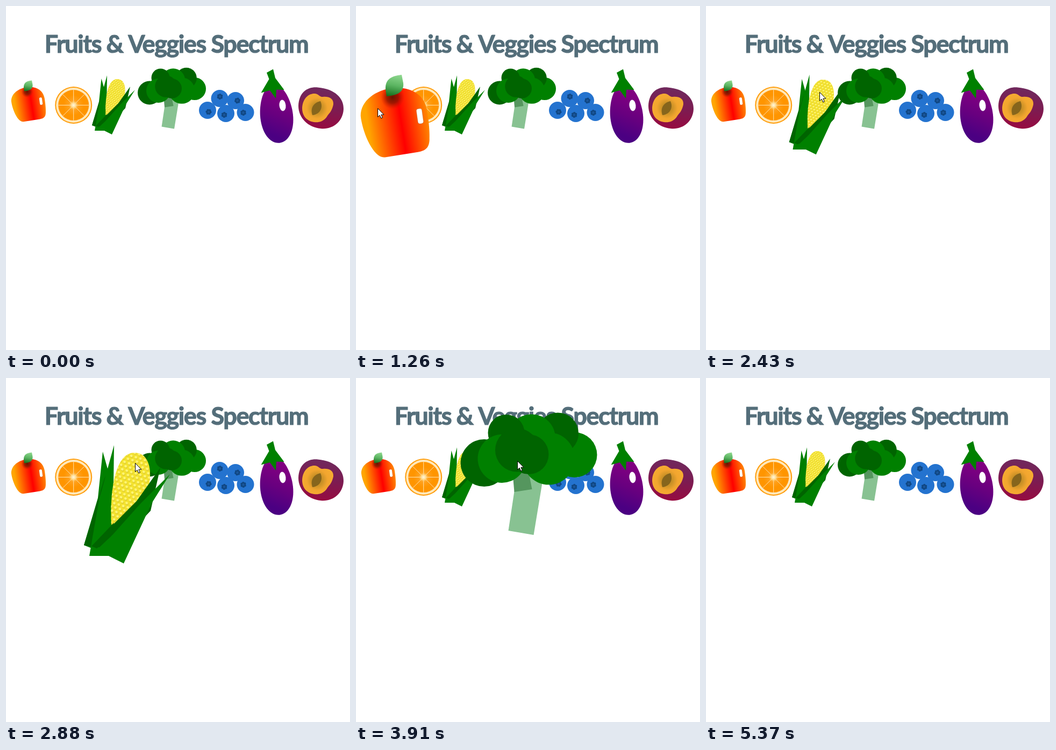
Animation, 640 px wide and 640 px high, one loop 6.11 s. Source, as an HTML page with a canvas:

```html
<!DOCTYPE html>
<html lang="en">
<head>
<meta charset="utf-8">
<title>Fruits &amp; Veggies Spectrum</title>
<style>
  html, body { margin: 0; width: 100%; height: 100%; overflow: hidden; background: #fff; }
  canvas { display: block; width: 640px; height: 640px; }
</style>
</head>
<body>
<canvas id="stage" width="640" height="640"></canvas>
<script>
const ctx = document.getElementById('stage').getContext('2d');
const LOOP = 6110, GROW = 400;
const GREEN = '#008000', DARK_GREEN = '#006400';

function fillPath(d, color) {
  ctx.fillStyle = color;
  ctx.fill(new Path2D(d));
}

function disc(x, y, r, color) {
  ellipse(x, y, r, r, 0, color);
}

function ellipse(x, y, rx, ry, angle, color) {
  ctx.beginPath();
  ctx.ellipse(x, y, rx, ry, angle, 0, Math.PI * 2);
  ctx.fillStyle = color;
  ctx.fill();
}

function withStops(gradient, colors) {
  colors.forEach((c, i) => gradient.addColorStop(i / (colors.length - 1), c));
  return gradient;
}
const linear = (x0, y0, x1, y1, ...colors) =>
  withStops(ctx.createLinearGradient(x0, y0, x1, y1), colors);
const radial = (x, y, r, ...colors) =>
  withStops(ctx.createRadialGradient(x, y, 0, x, y, r), colors);

function drawPepper() {
  ctx.save();
  ctx.translate(42.5, 182.3);
  ctx.rotate(-0.157);
  fillPath('M-31.5-8C-31.5-22-17-31.5 0-31.5C17-31.5 30.5-22 30.5-6' +
    'C30.5 8 29.5 16 28.5 21C27 29 23 31 16 31H-15C-25 31-31.5 8-31.5-8Z',
    linear(-26, 0, 36, 0, '#ffa500', '#ff0000', '#ffa500'));
  ctx.restore();

  disc(39.5, 159.5, 11, radial(39.5, 159.5, 11,
    'rgba(95,20,0,.95)', 'rgba(130,22,0,.75)', 'rgba(190,30,0,0)'));
  fillPath('M34 158.5L33 152C32.5 143 38 139.5 48 138.5L49.5 146C50.5 154 45 157.5 34 158.5Z',
    linear(44, 138, 40, 159, '#90d890', '#5cb562', '#146e1c'));

  ctx.save();
  ctx.translate(65, 177);
  ctx.rotate(-0.14);
  ctx.beginPath();
  ctx.roundRect(-2.6, -7, 5.2, 14, 2);
  ctx.fillStyle = '#fff';
  ctx.fill();
  ctx.strokeStyle = 'rgba(120,90,60,.35)';
  ctx.lineWidth = 0.4;
  ctx.stroke();
  ctx.restore();
}

function drawOrange() {
  const x = 125.7, y = 184.5;
  disc(x, y, 34.5, '#ff9d0a');
  disc(x, y, 32.5, '#ffe9bd');
  disc(x, y, 28.5, radial(x, y, 28.5, '#ffb83c', '#ffa01c', '#ff9500', '#ff9500'));
  ctx.strokeStyle = '#ffe2b0';
  ctx.lineWidth = 1;
  ctx.beginPath();
  for (let i = 0; i < 8; i++) {
    const a = i * Math.PI / 4;
    ctx.moveTo(x, y);
    ctx.lineTo(x + 28.5 * Math.cos(a), y + 28.5 * Math.sin(a));
  }
  ctx.stroke();
  disc(x, y, 9, radial(x, y, 9, '#fff6df', 'rgba(255,226,160,.8)', 'rgba(255,190,80,0)'));
}

function drawCorn() {
  fillPath('M177.5 135L186 165L184 202L170 226L160 222L173 178Z', GREEN);
  fillPath('M179 160L183 152L177 188L168 224L160 222Z', DARK_GREEN);
  fillPath('M188 129L187 202L183 232H165L174 180Z', GREEN);

  const cob = 'M185.5 203C184 175 188 136 207 136C225 136 225 165 214 182C206 194 194 200 185.5 203Z';
  fillPath(cob, '#f4e32e');
  ctx.save();
  ctx.clip(new Path2D(cob));
  ctx.translate(204, 169);
  ctx.rotate(0.3);
  for (let row = -10; row <= 10; row++) {
    for (let col = -6; col <= 6; col++) {
      const x = col * 4.4 + (row & 1) * 2.2, y = row * 3.6;
      ellipse(x + 0.6, y + 0.8, 1.4, 1.2, 0, '#e3d033');
      ellipse(x, y, 1.2, 1.1, 0, '#fff574');
    }
  }
  ctx.restore();

  fillPath('M231 150L222 190L190 224L170 224L187 203L209 181Z', DARK_GREEN);
  fillPath('M240 156L223 183L197 239L183 232H166L187 212L212 184Z', GREEN);
  fillPath('M167 223L188 201L185 214L172 225Z', DARK_GREEN);
}

function drawBroccoli() {
  fillPath('M298 168L322 174L313 228.5L289.5 224.5Z', '#88c292');
  fillPath('M293.5 171L308 168L311.5 186L295 188.5Z', '#55965e');
  const florets = [
    [351, 154, 21, 0], [335.5, 134, 19.3, 1], [311, 138.5, 22.3, 0],
    [287.5, 133.5, 17, 1], [267, 161.5, 22, 1], [283.5, 157.5, 22.5, 0],
    [327, 157.5, 24.3, 0], [297.5, 149.5, 20.3, 1], [308.5, 153.5, 18.5, 1]
  ];
  for (const [x, y, r, dark] of florets) disc(x, y, r, dark ? DARK_GREEN : GREEN);
}

function drawBerries() {
  const berries = [
    [375, 194, 2, 3], [397.5, 172, 0.5, -3.5], [427, 176, 3.5, 0],
    [409, 200, -3, 2.5], [445.5, 198, -4, 0.5]
  ];
  for (const [x, y, dx, dy] of berries) {
    disc(x, y, 16, '#2473cf');
    const cx = x + dx, cy = y + dy;
    for (let i = 0; i < 6; i++) {
      const a = i * Math.PI / 3 + x;
      disc(cx + 3.4 * Math.cos(a), cy + 3.4 * Math.sin(a), 2.2, '#104783');
    }
    disc(cx, cy, 3.8, '#104783');
    disc(cx, cy, 2.2, '#1b579b');
  }
}

function drawEggplant() {
  ctx.save();
  ctx.translate(503, 200);
  ctx.rotate(-0.11);
  fillPath('M0-54C19-54 30.5-21 30.5 5C30.5 35 17 55 0 55C-17 55-30.5 35-30.5 5C-30.5-21-19-54 0-54Z',
    linear(18, -30, -18, 35, '#800080', '#68007f', '#4b0082'));
  ctx.restore();
  ellipse(514.5, 185, 6, 10.5, -0.1, '#fff');
  fillPath('M497 117.5L485 124L489.5 136L474.5 161.5L491 157L502 172L503 155.5L517.5 156L501 134Z', GREEN);
}

function drawPlum() {
  fillPath('M544 186C545 160 561 150 580 151.5C612 154 629 172 628 192C627 215 608 230 586 228C562 226 544 208 544 186Z',
    linear(592, 152, 582, 228, '#6f295d', '#7d1b51', '#980a40'));
  fillPath('M551 190C552 170 565 162 575 163C582 164 584 170 590 169C600 168 610 172 609 183' +
    'C606 198 600 200 597 206C590 216 580 217 573 216C560 214 551 205 551 190Z',
    radial(579, 190, 29, '#b88321', '#c99126', '#f2a52f', '#f6ab31'));
  fillPath('M585 177C591 190 583 202 570 203C566 191 571 180 585 177Z', '#86651c');
}

// Hover origin is the fixed point of the enlargement.
const items = [
  { draw: drawPepper, ox: 11, oy: 149, from: 880, to: 1760 },
  { draw: drawOrange, ox: 91, oy: 150, from: 1760, to: 2332 },
  { draw: drawCorn, ox: 175, oy: 133, from: 2332, to: 3240 },
  { draw: drawBroccoli, ox: 295.5, oy: 165, from: 3310, to: 4140 },
  { draw: drawBerries, ox: 359, oy: 178, from: 4140, to: 5020 },
  { draw: drawEggplant, ox: 0, oy: 0 },
  { draw: drawPlum, ox: 0, oy: 0 }
];

// Pointer stops: time, x, y.
const pointerPath = [
  [430, 90, 609], [860, 46, 225], [1070, 40, 200], [1256, 40, 190],
  [1628, 105, 185], [1782, 140, 180], [2332, 196, 162], [2422, 211, 160],
  [3240, 265, 156], [3320, 280, 155], [3898, 300, 154], [4170, 362, 202],
  [4558, 455, 186], [4868, 470, 236], [5050, 480, 320], [5300, 490, 457]
];

// cubic-bezier(.25, .1, .25, 1)
function ease(x) {
  if (x <= 0) return 0;
  if (x >= 1) return 1;
  const curve = (a, b, u) => 3 * a * u * (1 - u) ** 2 + 3 * b * u * u * (1 - u) + u ** 3;
  let lo = 0, hi = 1;
  for (let i = 0; i < 24; i++) {
    const mid = (lo + hi) / 2;
    if (curve(0.25, 0.25, mid) < x) lo = mid; else hi = mid;
  }
  return curve(0.1, 1, lo);
}

// The picture advances in short steps, ten to a run.
const runs = [430, 1070, 1720, 2360, 3010, 3650, 4310, 4990];
function stepTime(t) {
  const start = runs.filter(s => s <= t).pop();
  if (start === undefined) return 0;
  return start + Math.min(9, Math.floor((t - start) / 62)) * 62;
}

function drawTitle() {
  ctx.font = 'bold 45px Lato, sans-serif';
  ctx.letterSpacing = '-1.4px';
  ctx.textAlign = 'center';
  ctx.fillStyle = ctx.strokeStyle = '#546e7a';
  ctx.lineWidth = 1.2;
  ctx.lineJoin = 'round';
  ctx.fillText('Fruits & Veggies Spectrum', 317, 87);
  ctx.strokeText('Fruits & Veggies Spectrum', 317, 87);
}

function drawPointer(t) {
  const next = pointerPath.findIndex(p => p[0] > t);
  const last = pointerPath[pointerPath.length - 1];
  if (next === 0 || t > last[0]) return;
  const b = next < 0 ? last : pointerPath[next];
  const a = next < 0 ? last : pointerPath[next - 1];
  const k = a === b ? 0 : (t - a[0]) / (b[0] - a[0]);
  ctx.save();
  ctx.translate(Math.round(a[1] + (b[1] - a[1]) * k) + 0.5,
                Math.round(a[2] + (b[2] - a[2]) * k) + 0.5);
  const arrow = new Path2D('M0 0V16L3.7 12.7L6.2 18.5L8.8 17.4L6.4 11.7H11.4Z');
  ctx.fillStyle = '#fff';
  ctx.fill(arrow);
  ctx.strokeStyle = '#000';
  ctx.lineWidth = 1;
  ctx.lineJoin = 'miter';
  ctx.stroke(arrow);
  ctx.restore();
}

function drawItem({ draw, ox, oy, grow }) {
  ctx.save();
  ctx.translate(ox, oy);
  ctx.scale(1 + grow, 1 + grow);
  ctx.translate(-ox, -oy);
  draw();
  ctx.restore();
}

function render(now) {
  const t = stepTime(now % LOOP);
  ctx.fillStyle = '#fff';
  ctx.fillRect(0, 0, 640, 640);
  drawTitle();
  for (const item of items) {
    item.grow = t >= item.from && t < item.to ? ease((t - item.from) / GROW) : 0;
  }
  items.filter(i => i.grow < 0.5).forEach(drawItem);
  items.filter(i => i.grow >= 0.5).forEach(drawItem);
  drawPointer(t);
}

const begin = performance.now();
function tick() {
  render(performance.now() - begin);
  requestAnimationFrame(tick);
}
tick();
</script>
</body>
</html>
```
